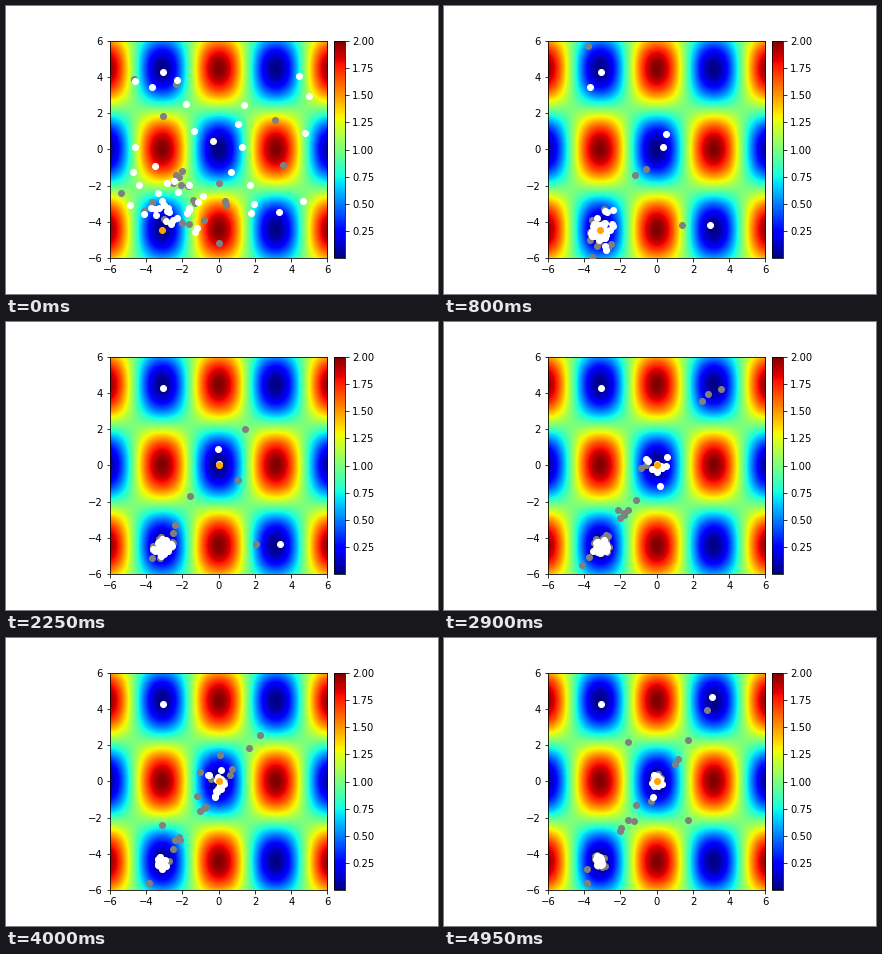
A matplotlib script for the animation above (5 s loop, 432 by 288 pixels).

```python
import numpy as np
import matplotlib.pyplot as plt
from matplotlib.animation import FuncAnimation

W, H, DPI = 432, 288, 72
STEP, FRAMES = 50, 100
LEFT, TOP, SIDE, LIM = 104, 34.56, 217.44, 6
BEES, PAIR, JOINERS = 50, 2, 16

# Valleys of the field
CENTRE = np.zeros(2)
CORNER = np.array([-np.pi, -np.pi * np.sqrt(2)])
LOWER_RIGHT = CORNER * [-1, 1]
UPPER_RIGHT = -CORNER

plt.rcParams.update({"font.family": "DejaVu Sans", "font.size": 10})


def griewank(x, y):
    return 1 + (x**2 + y**2) / 4000 - np.cos(x) * np.cos(y / np.sqrt(2))


def first_sources(rng):
    """Half the bees anywhere on low ground, half near the corner valley."""
    spread = rng.uniform(-5, 5, (200, 2))
    spread = spread[griewank(*spread.T) < 1.2][:BEES // 2]
    near = rng.normal([-2.3, -3.2], [1.1, 0.9], (BEES - len(spread), 2))
    return rng.permutation(np.vstack([spread, near]))


def homes_at(ms, join):
    """Valley each bee is drawn to at a given time."""
    homes = np.tile(CORNER, (BEES, 1))
    homes[:PAIR] = CENTRE
    homes[ms >= join] = CENTRE
    if ms < 2800:
        homes[PAIR] = LOWER_RIGHT
    elif ms >= 4200:
        homes[PAIR] = UPPER_RIGHT
    return homes


def build_paths(rng):
    """Bees hop around their valley and keep only better places."""
    join = np.full(BEES, np.inf)
    join[PAIR + 1:PAIR + 1 + JOINERS] = rng.uniform(2300, 3400, JOINERS)
    bees, homes = first_sources(rng), homes_at(0, join)
    paths = [bees]
    for n in range(1, FRAMES):
        old, homes = homes, homes_at(n * STEP, join)
        hop = homes + rng.normal(0, [0.45, 0.7], (BEES, 2))
        better = griewank(*hop.T) < griewank(*bees.T)
        lured = (homes != old).any(axis=1)
        move = lured | (better & (rng.random(BEES) < 0.2))
        bees = np.where(move[:, None], hop, bees)
        paths.append(bees)
    return paths


def explore(bees, rng):
    """Step along the line to a random partner; keep the failed trials."""
    partner = bees[rng.permutation(BEES)]
    phi = rng.uniform(-1, 1, (BEES, 1))
    new = bees + phi * (bees - partner)
    return new[griewank(*new.T) > griewank(*bees.T)]


rng = np.random.default_rng(7)
paths = build_paths(rng)
trials = [explore(bees, rng) for bees in paths]

fig = plt.figure(figsize=(W / DPI, H / DPI), dpi=DPI, facecolor="white")


def add_axes(x, w):
    return fig.add_axes([x / W, 1 - (TOP + SIDE) / H, w / W, SIDE / H])


ax = add_axes(LEFT, SIDE)
grid = np.linspace(-LIM, LIM, 241)
field = griewank(*np.meshgrid(grid, grid))
image = ax.imshow(field, cmap="jet", origin="lower", aspect="auto",
                  extent=[-LIM, LIM, -LIM, LIM], interpolation="bilinear")
ax.set(xlim=(-LIM, LIM), ylim=(-LIM, LIM),
       xticks=range(-6, 7, 2), yticks=range(-6, 7, 2))
fig.colorbar(image, cax=add_axes(328.1, SIDE / 20),
             ticks=np.arange(0.25, 2.01, 0.25))


def dots(color, z):
    return ax.plot([], [], "o", ms=6, color=color, zorder=z)[0]


tried, sources, best = dots("gray", 3), dots("white", 4), dots("orange", 5)


def update(n):
    x, y = CORNER if n * STEP < 2000 else CENTRE
    tried.set_data(*trials[n].T)
    sources.set_data(*paths[n].T)
    best.set_data([x], [y])
    return tried, sources, best


anim = FuncAnimation(fig, update, frames=FRAMES, interval=STEP,
                     repeat=True, repeat_delay=0)
plt.show()
```
